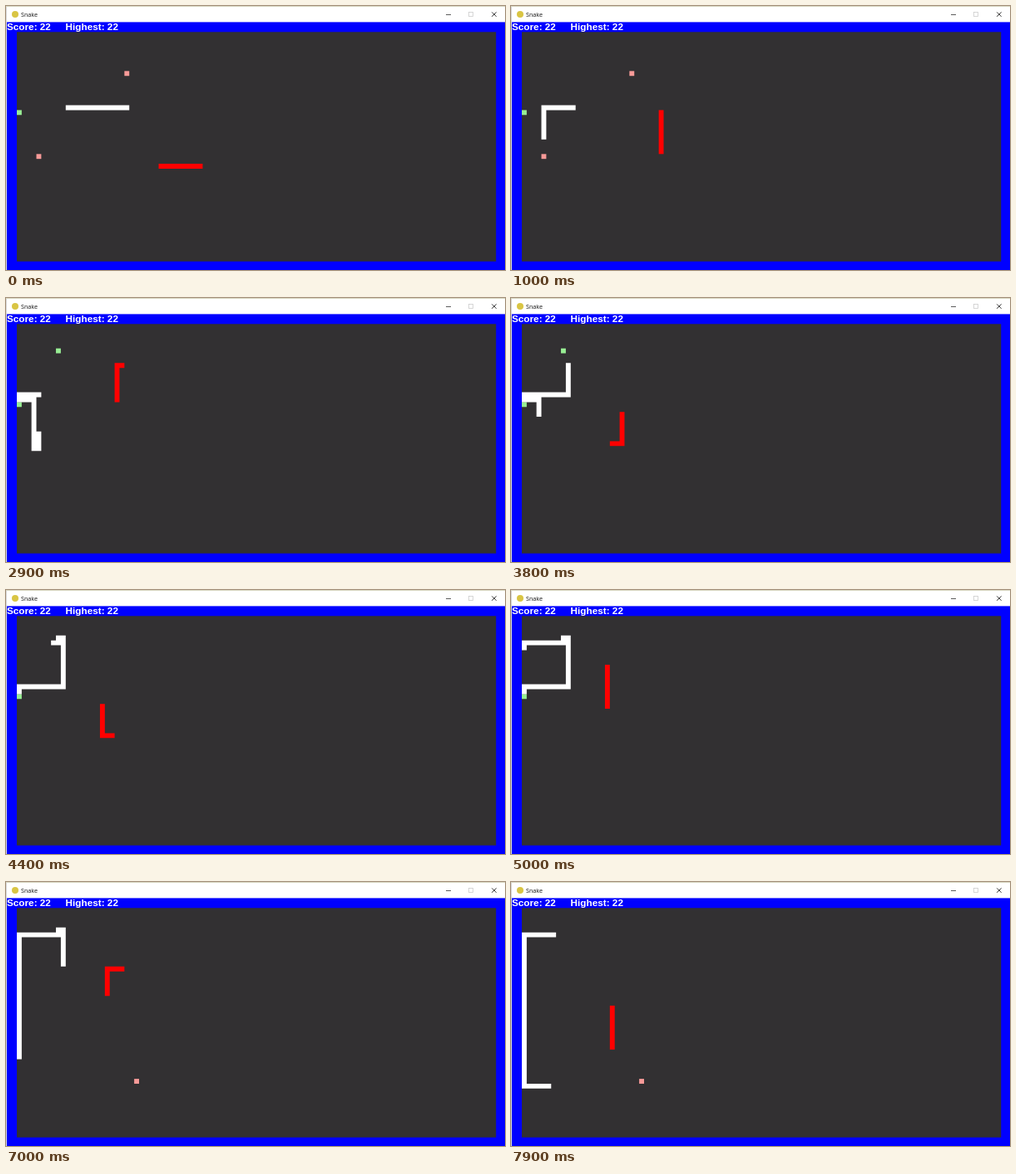
Recreate the animation shown at these times as an HTML page with a canvas. Size 600 by 318 pixels, loop 8 s.

```html
<!DOCTYPE html>
<html lang="en">
<head>
<meta charset="utf-8">
<title>Snake</title>
<style>
  html, body { margin: 0; width: 100%; height: 100%; overflow: hidden; }
  canvas { display: block; }
</style>
</head>
<body>
<canvas id="stage" width="600" height="318"></canvas>
<script>
const ctx = document.getElementById('stage').getContext('2d');
const CELL = 5.88, LEFT = 13, TOP = 31.3;
const LOOP = 8000, FRAME = 100;
const PINK = '#f79a98', GREEN = '#98ee94';

// Expands corner points into every grid cell along the route.
function route(points) {
  const cells = [points[0]];
  for (const [tx, ty] of points.slice(1)) {
    let [x, y] = cells[cells.length - 1];
    while (x !== tx || y !== ty) {
      x += Math.sign(tx - x);
      y += Math.sign(ty - y);
      cells.push([x, y]);
    }
  }
  return cells;
}

const whiteRoute = route([[22, 15], [4, 15], [4, 25], [3, 25], [3, 15], [0, 15], [0, 14],
  [9, 14], [9, 4], [8, 4], [8, 5], [0, 5], [0, 36], [12, 36]]);
const redRoute = route([[37, 27], [28, 27], [28, 8], [20, 8], [20, 24], [17, 24], [17, 9],
  [25, 9], [25, 12], [18, 12], [18, 40]]);

// Each food is visible from one step up to another.
const foods = [
  { at: [22, 8], color: PINK, from: 0, to: 20 },
  { at: [4, 25], color: PINK, from: 0, to: 16 },
  { at: [0, 16], color: GREEN, from: 0, to: 71 },
  { at: [8, 5], color: GREEN, from: 30, to: 52 },
  { at: [24, 35], color: PINK, from: 69, to: Infinity }
];
const meals = [16, 52, 71];

function rect(color, x, y, w, h) {
  ctx.fillStyle = color;
  ctx.fillRect(x, y, w, h);
}

function text(string, x, y, font, color) {
  ctx.font = font;
  ctx.fillStyle = color;
  ctx.fillText(string, x, y);
}

function line(color, width, points) {
  ctx.strokeStyle = color;
  ctx.lineWidth = width;
  ctx.beginPath();
  points.forEach(([x, y]) => ctx.lineTo(x, y));
  ctx.stroke();
}

function drawWindow() {
  rect('#fff', 0, 0, 600, 318);
  rect('#d9d8c2', 0, 0, 600, 1);
  rect('#d8d8d8', 0, 1, 1, 317);
  rect('#00f', 1, 19.4, 599, 298.6);
  rect('#323032', LEFT, TOP, 98 * CELL, 47 * CELL);

  ctx.fillStyle = '#d9c544';
  ctx.beginPath();
  ctx.arc(11, 10, 4, 0, 7);
  ctx.fill();
  text('Snake', 18, 12.8, '7.2px "Open Sans", sans-serif', '#111');

  ctx.lineCap = 'butt';
  line('#333', 0.8, [[529, 10.5], [535, 10.5]]);
  ctx.strokeStyle = '#ccc';
  ctx.strokeRect(556.5, 7.5, 5, 5);
  line('#222', 0.9, [[584.2, 7.4], [589.6, 12.8]]);
  line('#222', 0.9, [[589.6, 7.4], [584.2, 12.8]]);

  const bold = 'bold 11.76px "Liberation Sans", Arial, sans-serif';
  text('Score: 22', 1, 28.6, bold, '#fff');
  text('Highest: 22', 71.6, 28.6, bold, '#fff');
}

function drawSnake(cells, startLength, length, step, color) {
  const end = step + startLength;
  const body = cells.slice(end - length, end);
  ctx.lineCap = 'square';
  ctx.lineJoin = 'miter';
  line(color, CELL, body.map(([x, y]) => [LEFT + (x + 0.5) * CELL, TOP + (y + 0.5) * CELL]));
}

function draw(time) {
  const t = Math.floor(time % LOOP / FRAME) * FRAME;
  const step = Math.floor(t * 0.01215 + 0.3);
  // Every meal lengthens the white snake by ten cells, one per step.
  const length = meals.reduce((sum, m) => sum + Math.min(10, Math.max(0, step - m)), 13);

  drawWindow();
  for (const { at: [x, y], color, from, to } of foods) {
    if (step >= from && step < to) rect(color, LEFT + x * CELL, TOP + y * CELL, CELL, CELL);
  }
  drawSnake(whiteRoute, 13, length, step, '#fff');
  drawSnake(redRoute, 9, 9, step, '#f00');
}

const start = performance.now();
function tick() {
  draw(performance.now() - start);
  requestAnimationFrame(tick);
}
tick();
</script>
</body>
</html>
```
